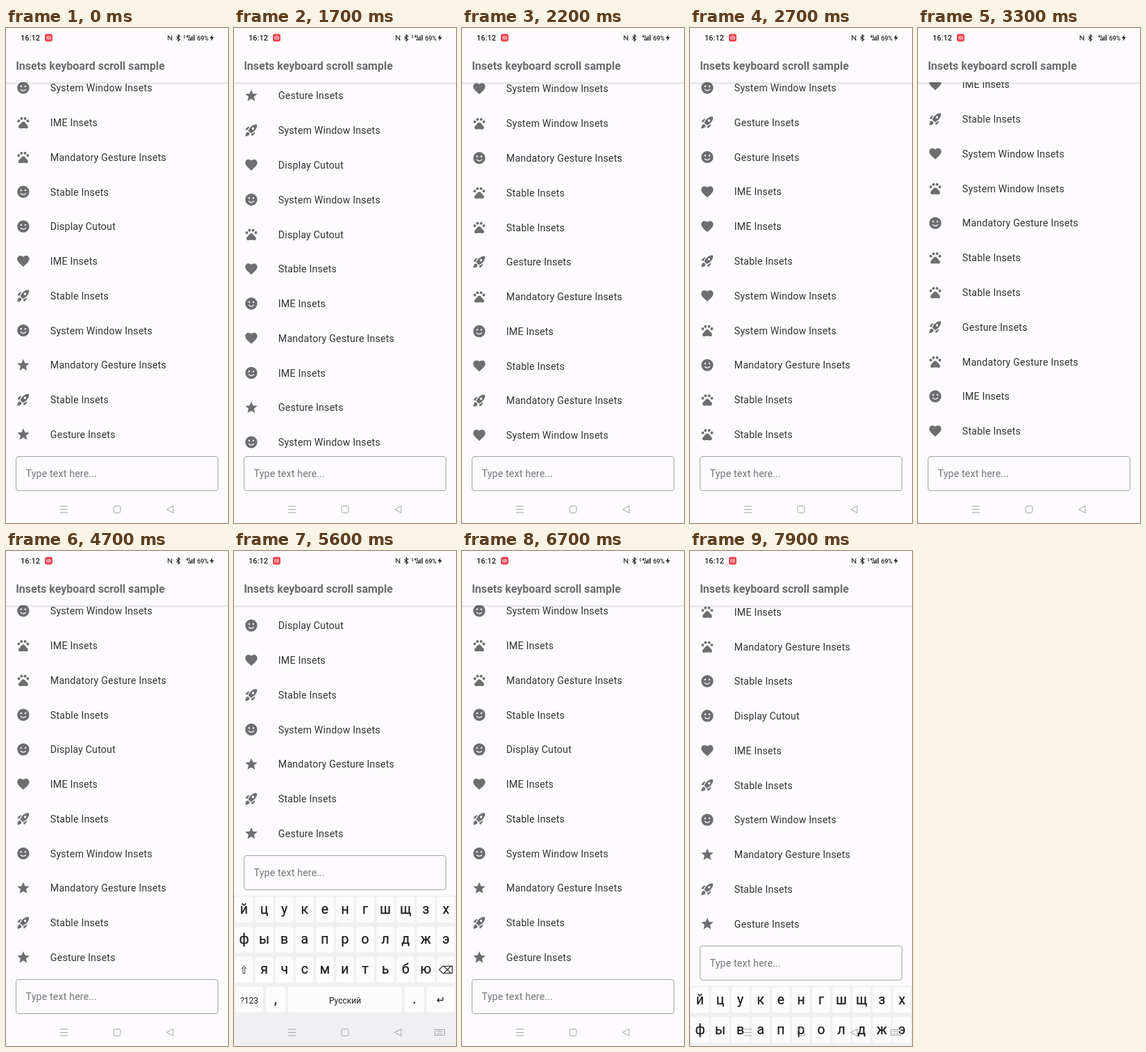
An HTML page that plays this animation: 320 px wide and 711 px high, repeating every 8000 ms.

```html
<!DOCTYPE html>
<html lang="en">
<head>
<meta charset="utf-8">
<title>Insets keyboard scroll sample</title>
<style>
  html, body { margin: 0; width: 100%; height: 100%; overflow: hidden; background: #fdfbfe; }
  svg { display: block; width: 100vw; height: 100vh; font-family: Roboto, "Noto Sans", sans-serif; }
  .label { font-size: 14.22px; letter-spacing: .18px; fill: #333335; }
  .icon { fill: #6e6e71; fill-rule: evenodd; }
  .line { fill: none; stroke: #a3a2a5; }
  .key { font-size: 19.5px; text-anchor: middle; fill: #1c1c1e; stroke: #1c1c1e; stroke-width: .25; }
  .small { font-size: 12px; stroke: none; }
  .sign { font-family: "DejaVu Sans", sans-serif; font-size: 15px; stroke: none; }
</style>
</head>
<body>
<svg viewBox="0 0 320 711" preserveAspectRatio="none">
  <defs>
    <linearGradient id="shade" x2="0" y2="1">
      <stop stop-color="#000" stop-opacity=".12"/>
      <stop offset="1" stop-color="#000" stop-opacity="0"/>
    </linearGradient>
  </defs>
  <rect width="320" height="711" fill="#fdfbfe"/>
  <g id="list"></g>

  <g id="dock">
    <rect y="608.6" width="320" height="300" fill="#fdfbfe"/>
    <rect class="line" x="14.5" y="615.5" width="291" height="49" rx="3.5"/>
    <text x="28.6" y="644.8" font-size="14.22" letter-spacing=".14" fill="#747376">Type text here...</text>
  </g>

  <g id="keyboard"><rect width="320" height="230" fill="#f0f0f2"/></g>

  <g id="nav" class="line">
    <path d="M78 687H89M78 691.5H89M78 696H89"/>
    <rect x="155" y="686.5" width="10" height="10" rx="2.5"/>
    <path d="M231.5 691.5L241 686.5V696.5Z" stroke-linejoin="round"/>
    <path id="switcher" d="M289.5 687.5h14v8h-14zM292 690h9M293 693h7"/>
  </g>

  <g id="header">
    <rect width="320" height="78" fill="#fdfbfe"/>
    <rect y="78" width="320" height="4" fill="url(#shade)"/>
    <text x="14.2" y="60" font-size="16" font-weight="700" fill="#6b6a6d">Insets keyboard scroll sample</text>
    <text x="21" y="18" font-size="11" font-weight="500" fill="#222">16:12</text>
    <rect x="56" y="8.5" width="11" height="11" rx="3" fill="#ee4150"/>
    <rect x="58.5" y="12" width="6" height="4.2" rx="1.2" fill="#f58a93" stroke="#fbd0d4" stroke-width=".7"/>
    <g fill="none" stroke="#222" stroke-width="1.1">
      <path d="M233.8 17.5V11L238.8 17.2V10.5"/>
      <path d="M245.6 11.8L250.8 16.4L248.3 18.6V9.6L250.8 11.8L245.6 16.4"/>
      <path d="M263.4 18V15.5M265.8 18V14M268.2 18V12M271 18V10" stroke-width="1.5"/>
    </g>
    <text x="259.5" y="13.6" font-size="5" font-weight="700" fill="#222">4G</text>
    <path id="traffic" d="M255.8 12L257.2 10L258.6 12ZM255.8 13.2L257.2 15.2L258.6 13.2Z" fill="#333"/>
    <text x="275.5" y="17.5" font-size="8.8" font-weight="500" fill="#222">69%</text>
    <path d="M297.6 9.5L293.6 14.8H296.3L295.6 18.8L299.8 13.2H297Z" fill="#222"/>
  </g>
</svg>

<script>
const LOOP = 8000, STEP = 100;
const PITCH = 49.78, LAST_Y = 584, RISE = 178;
const $ = id => document.getElementById(id);

function add(parent, tag, attrs, text) {
  const el = document.createElementNS("http://www.w3.org/2000/svg", tag);
  for (const name in attrs) el.setAttribute(name, attrs[name]);
  if (text) el.textContent = text;
  parent.append(el);
  return el;
}

const dot = (x, y, r) => `M${x - r} ${y}a${r} ${r} 0 1 0 ${2 * r} 0a${r} ${r} 0 1 0 ${-2 * r} 0z`;

const icons = {
  s: "M12 17.27L18.18 21l-1.64-7.03L22 9.24l-7.19-.61L12 2 9.19 8.63 2 9.24l5.46 4.73L5.82 21z",
  h: "M12 21.35l-1.45-1.32C5.4 15.36 2 12.28 2 8.5 2 5.42 4.42 3 7.5 3c1.74 0 3.41.81 4.5 2.09C13.09 3.81 14.76 3 16.5 3 19.58 3 22 5.42 22 8.5c0 3.78-3.4 6.86-8.55 11.54z",
  f: dot(12, 12, 10) + dot(8.5, 9.5, 1.4) + dot(15.5, 9.5, 1.4) +
     "M6.9 14C8.8 18.6 15.2 18.6 17.1 14H15.6C13.8 16.6 10.2 16.6 8.4 14z",
  p: dot(4.5, 9.5, 2.3) + dot(9, 5.5, 2.3) + dot(15, 5.5, 2.3) + dot(19.5, 9.5, 2.3) +
     "M17.34 14.86L14.86 11.95C13.2 10.1 10.8 10.1 9.14 11.95L6.66 14.86C5.35 16.17 3.74 17.62 4.04 19.65C4.33 20.67 5.06 21.68 6.37 21.97C7.1 22.12 9.43 21.53 12 21.53S16.9 22.12 17.63 21.97C18.94 21.68 19.67 20.67 19.96 19.65C20.26 17.62 18.65 16.17 17.34 14.86z",
  r: "M9.19 6.35c-2.04 2.29-3.44 5.58-3.57 5.89L2 10.69l4.05-4.05c.47-.47 1.15-.68 1.81-.55zM11.17 17s3.74-1.55 5.89-3.7c5.4-5.4 4.5-9.62 4.21-10.57-.95-.3-5.17-1.19-10.57 4.21C8.55 9.09 7 12.83 7 12.83zM17.65 14.81c-2.29 2.04-5.58 3.44-5.89 3.57L13.31 22l4.05-4.05c.47-.47.68-1.15.55-1.81zM9 18c0 .83-.34 1.58-.88 2.12C6.94 21.3 2 22 2 22s.7-4.94 1.88-6.12C4.42 15.34 5.17 15 6 15c1.66 0 3 1.34 3 3z" + dot(15, 9, 2)
};
const labels = {
  W: "System Window Insets", I: "IME Insets", M: "Mandatory Gesture Insets",
  S: "Stable Insets", D: "Display Cutout", G: "Gesture Insets"
};

// Each row: icon letter, label letter
const rows = ("fW rG fG hI hI rS hW pW fM pS pS rG pM fI hS rM hW " +
  "sG rW hD fW pD hS fI hM fI sG fW pI pM fS fD hI rS fW sM rS sG").split(" ");

rows.forEach(([icon, label], i) => {
  const y = LAST_Y - (rows.length - 1 - i) * PITCH;
  add($("list"), "path", { class: "icon", d: icons[icon], transform: `translate(24.9 ${y - .3}) scale(.87) translate(-12 -12)` });
  add($("list"), "text", { class: "label", x: 63.8, y: y + 5 }, labels[label]);
});

function addKey(x, row, width, text, kind = "") {
  const y = 20.5 + row * 43;
  add($("keyboard"), "rect", { x: x - width / 2, y: y - 18.5, width, height: 37, rx: 4, fill: "#fcfcfd" });
  add($("keyboard"), "text", { class: "key " + kind, x, y: y + 6 }, text);
}
["йцукенгшщзх", "фывапролджэ", "⇧ячсмитьбю⌫"].forEach((line, row) =>
  [...line].forEach((c, i) => addKey(14.5 + i * 29.1, row, 26, c, /[⇧⌫]/.test(c) ? "sign" : "")));
addKey(22, 3, 40, "?123", "small");
addKey(60, 3, 28, ",");
addKey(160, 3, 164, "Русский", "small");
addKey(260, 3, 28, ".");
addKey(298, 3, 40, "↵", "sign");

// Scroll distance from the end of the list: [time, px]
const scrollKeys = [[0, 0], [1250, 0], [1700, 509], [2700, 1344], [3800, 805], [4500, 0],
  [6950, 0], [7400, 520], [7780, 0], [LOOP, 0]];

const rate = i => (scrollKeys[i + 1][1] - scrollKeys[i][1]) / (scrollKeys[i + 1][0] - scrollKeys[i][0]);

function slope(i) {
  if (i === 0 || i === scrollKeys.length - 1) return 0;
  const a = rate(i - 1), b = rate(i);
  return a * b > 0 ? 2 * a * b / (a + b) : 0;
}

function scrollAt(t) {
  const i = scrollKeys.findIndex((k, n) => t < scrollKeys[n + 1][0]);
  const [t0, y0] = scrollKeys[i], [t1, y1] = scrollKeys[i + 1];
  const d = t1 - t0, u = (t - t0) / d, v = 1 - u;
  return y0 * v * v * (1 + 2 * u) + y1 * u * u * (1 + 2 * v) + d * u * v * (slope(i) * v - slope(i + 1) * u);
}

const ease = (t, start) => 1 - (1 - Math.min(1, Math.max(0, (t - start) / 400))) ** 3;
const imeAt = t => RISE * (ease(t, 4760) - ease(t, 6160) + ease(t, 7860));

function draw(t) {
  const ime = imeAt(t), open = ime > .1;
  $("list").setAttribute("transform", `translate(0 ${scrollAt(t) - ime})`);
  $("dock").setAttribute("transform", `translate(0 ${-ime})`);
  $("keyboard").setAttribute("transform", `translate(0 ${672.7 - ime})`);
  $("keyboard").style.display = $("switcher").style.display = open ? "" : "none";
  $("traffic").style.display = t < 2200 || t > 4800 ? "" : "none";
}

function tick(now) {
  draw(Math.floor(now % LOOP / STEP) * STEP);
  requestAnimationFrame(tick);
}
draw(0);
requestAnimationFrame(tick);
</script>
</body>
</html>
```
